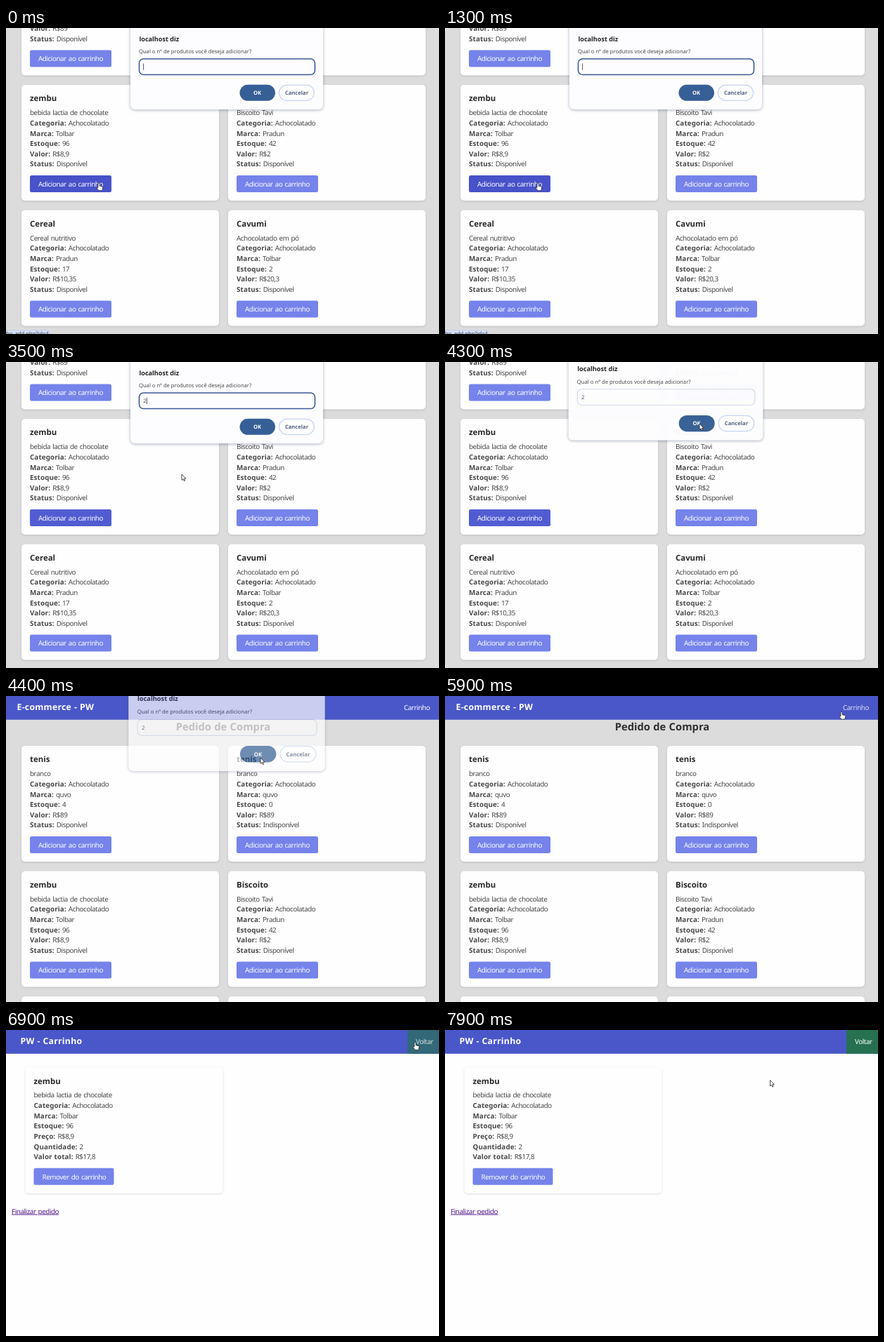
Recreate the animation shown at these times as an HTML page. Size 616 by 436 pixels, loop 8000 ms.

```html
<!DOCTYPE html>
<html lang="pt-BR">
<head>
<meta charset="utf-8">
<title>Carrinho</title>
<style>
html, body { margin: 0; width: 100%; height: 100%; overflow: hidden; background: #fff; }
svg { display: block; width: 616px; height: 436px; }
text { font: 9.84px "Noto Sans", "Open Sans", sans-serif; fill: #484848; letter-spacing: -.045em; word-spacing: .1em; text-rendering: geometricPrecision; }
.bold { font-weight: 700; letter-spacing: .01em; word-spacing: .03em; }
.title { font-size: 11.4px; fill: #282828; letter-spacing: 0; }
.heading { font-size: 14.76px; fill: #303030; letter-spacing: 0; text-anchor: middle; }
.brand { font-size: 12.3px; fill: #fff; letter-spacing: .02em; }
.light { fill: #fff; }
.link { fill: #551a8b; text-decoration: underline; }
.ui { font-size: 7.6px; letter-spacing: 0; word-spacing: 0; }
.semi { font-weight: 600; }
.center { text-anchor: middle; }
.card { fill: #fefefe; filter: drop-shadow(0 1px 1.5px rgba(0, 0, 0, .13)); }
#panel { fill: #fdfdff; filter: drop-shadow(0 1px 2px rgba(50, 60, 100, .4)); }
</style>
</head>
<body>
<svg viewBox="0 0 616 436">
  <g id="shop"></g>
  <g id="cart"></g>
  <g id="status">
    <path d="M0 430.5H59q3 0 3 3V436H0z" fill="#d3dff6" stroke="#bccae6" stroke-width=".6"/>
    <text class="ui" x="0" y="438.2">ho_add.php?id=4</text>
  </g>
  <g id="dialog">
    <path id="panel" d="M177-10H451V109q0 7-7 7H184q-7 0-7-7z"/>
    <text class="ui semi" x="189.5" y="18.5" style="font-size:9.1px;fill:#222">localhost diz</text>
    <text class="ui" x="189" y="36">Qual o nº de produtos você deseja adicionar?</text>
    <rect id="field" x="189.5" y="44" width="250" height="22.5" rx="6" fill="#fdfdff"/>
    <text class="ui" id="amount" x="195.3" y="58">2</text>
    <path id="caret" d="M0 50.5V60" stroke="#333" stroke-width=".8"/>
    <rect x="332.5" y="80.8" width="50.5" height="23" rx="11.5" fill="#365f95"/>
    <text class="ui semi light center" x="357.6" y="95">OK</text>
    <rect x="388.5" y="81.3" width="50" height="22" rx="11" fill="#fff" stroke="#c8d4f2" stroke-width="1.2"/>
    <text class="ui semi center" x="413.5" y="95" style="fill:#53627e">Cancelar</text>
  </g>
  <g id="pointer" stroke="#222" stroke-width=".8" stroke-linejoin="round" fill="#fff">
    <path id="arrow" d="M0 0V8.4L2 6.7 3.3 9.6 4.7 9 3.4 6.2H6z"/>
    <path id="hand" d="M-1.1 1Q0-.7 1.1 1V4.5L5 5.5Q5.9 5.9 5.7 7.4L4.8 11.2H0L-2.9 7.6Q-3.1 6.1-1.1 6.9z"/>
  </g>
</svg>
<script>
const LOOP = 8000, STEP = 100, SCROLL = 168.5, LINE = 14.65;
const el = id => document.getElementById(id);
const show = (id, on) => el(id).style.display = on ? '' : 'none';

const text = (x, y, cls, s) => `<text x="${x}" y="${y}" class="${cls}">${s}</text>`;
const rect = (x, y, w, h, fill, extra = '') =>
  `<rect x="${x}" y="${y}" width="${w}" height="${h}" fill="${fill}" ${extra}/>`;

function card(x, y, name, description, fields, label, buttonWidth) {
  const lines = [description, ...Object.entries(fields).map(
    ([key, value]) => `<tspan class="bold">${key}:</tspan> ${value}`)];
  const buttonY = y + 43.2 + (lines.length - 1) * LINE + 12.5;
  const left = x + 12;
  return rect(x, y, 281, buttonY - y + 36, '#fefefe', 'rx="5" class="card"') +
    text(left, y + 23.3, 'bold title', name) +
    lines.map((line, i) => text(left, y + 43.2 + i * LINE, '', line)).join('') +
    rect(left, buttonY, buttonWidth, 24, '#7583ea', 'rx="2.5" class="button"') +
    text(left + 12, buttonY + 15.7, 'light', label);
}

const products = [
  ['tenis', 'branco', 'quvo', 4, '89'],
  ['tenis', 'branco', 'quvo', 0, '89'],
  ['zembu', 'bebida lactia de chocolate', 'Tolbar', 96, '8,9'],
  ['Biscoito', 'Biscoito Tavi', 'Pradun', 42, '2'],
  ['Cereal', 'Cereal nutritivo', 'Pradun', 17, '10,35'],
  ['Cavumi', 'Achocolatado em pó', 'Tolbar', 2, '20,3']
];
const NAV = '#4a57c9';

el('shop').innerHTML = rect(0, 0, 616, 700, '#dcdcdc') + rect(0, 0, 616, 33.8, NAV) +
  text(15.5, 20.3, 'bold brand', 'E-commerce - PW') +
  `<g id="cartLink">${text(566, 19.7, 'light', 'Carrinho')}</g>` +
  text(309, 49, 'bold heading', 'Pedido de Compra') +
  products.map(([name, description, brand, stock, price], i) =>
    card(i % 2 ? 316 : 22, 71 + (i >> 1) * 178.5, name, description, {
      Categoria: 'Achocolatado', Marca: brand, Estoque: stock, Valor: 'R$' + price,
      Status: stock ? 'Disponível' : 'Indisponível'
    }, 'Adicionar ao carrinho', 116)).join('');

const [chosen, chosenDescription, chosenBrand, chosenStock] = products[2];
el('cart').innerHTML = rect(0, 0, 616, 436, '#fefefe') + rect(0, 0, 616, 33.8, NAV) +
  text(20.5, 20.3, 'bold brand', 'PW - Carrinho') +
  rect(571, 0, 45, 33.8, NAV, 'id="back"') +
  `<g id="backLabel">${text(583, 19.7, 'light', 'Voltar')}</g>` +
  card(27.5, 53.2, chosen, chosenDescription, {
    Categoria: 'Achocolatado', Marca: chosenBrand, Estoque: chosenStock,
    'Preço': 'R$8,9', Quantidade: 2, 'Valor total': 'R$17,8'
  }, 'Remover do carrinho', 114) +
  text(8, 261.5, 'link', 'Finalizar pedido');

const chosenButton = document.querySelectorAll('#shop .button')[2];

// Pointer path: time, x, y
const path = [
  [0, 132, 220.5], [3300, 132, 220.5], [3500, 250, 160], [3700, 374, 88], [3800, 361, 82],
  [4200, 361, 82], [4300, 362, 88], [5100, 362, 88], [5200, 350, 104], [5400, 440, 75],
  [5600, 536, 30], [5800, 536, 30], [5900, 564, 22], [6000, 564, 22], [6300, 582, 17.2],
  [7800, 582, 17.2], [7900, 462.5, 71.5], [LOOP, 462.5, 71.5]
];

function pointerAt(t) {
  const i = path.findIndex(p => p[0] > t);
  const [t0, x0, y0] = path[i - 1], [t1, x1, y1] = path[i];
  const k = (t - t0) / (t1 - t0);
  return [x0 + (x1 - x0) * k, y0 + (y1 - y0) * k];
}

function drawDialog(t) {
  const typed = t >= 2500, closing = Math.max(0, (t - 4200) / 100);
  const blink = typed ? t - 2500 : t + 100;
  show('dialog', t < 4500);
  show('amount', typed);
  show('caret', !closing && Math.floor(blink / 500) % 2 === 0);
  el('caret').setAttribute('transform', `translate(${typed ? 200.3 : 195.6})`);
  el('field').setAttribute('stroke', closing ? '#d3daea' : '#3b5a97');
  el('field').setAttribute('stroke-width', closing ? 1.1 : 1.6);
  el('dialog').setAttribute('opacity', closing > 1 ? .71 : closing ? .98 : 1);
  el('dialog').setAttribute('transform',
    `translate(314 ${-5.7 * closing}) scale(${1 + .01 * closing}) translate(-314)`);
}

function draw(t) {
  const reloaded = t >= 4400, inCart = t >= 6800;
  show('cart', inCart);
  show('shop', !inCart);
  show('status', t < 3400);
  el('shop').setAttribute('transform', `translate(0 ${reloaded ? 0 : -SCROLL})`);
  chosenButton.setAttribute('fill', t < 3400 ? '#4852c9' : reloaded ? '#7583ea' : '#525cd2');
  el('cartLink').setAttribute('opacity', t >= 5900 ? .8 : 1);
  drawDialog(t);

  const hover = Math.min(1, Math.max(0, (t - 6700) / 300));
  const mix = (a, b) => Math.round(a + (b - a) * hover);
  el('back').setAttribute('fill', `rgb(${mix(74, 38)},${mix(87, 113)},${mix(201, 79)})`);
  el('backLabel').setAttribute('opacity', t < 7900 ? .78 : 1);

  const hand = t < 3400 || (t >= 5900 && t < 7900);
  show('hand', hand);
  show('arrow', !hand);
  el('pointer').setAttribute('transform', `translate(${pointerAt(t)})`);
}

function frame() {
  draw(Math.floor(performance.now() % LOOP / STEP) * STEP);
  requestAnimationFrame(frame);
}
frame();
</script>
</body>
</html>
```
